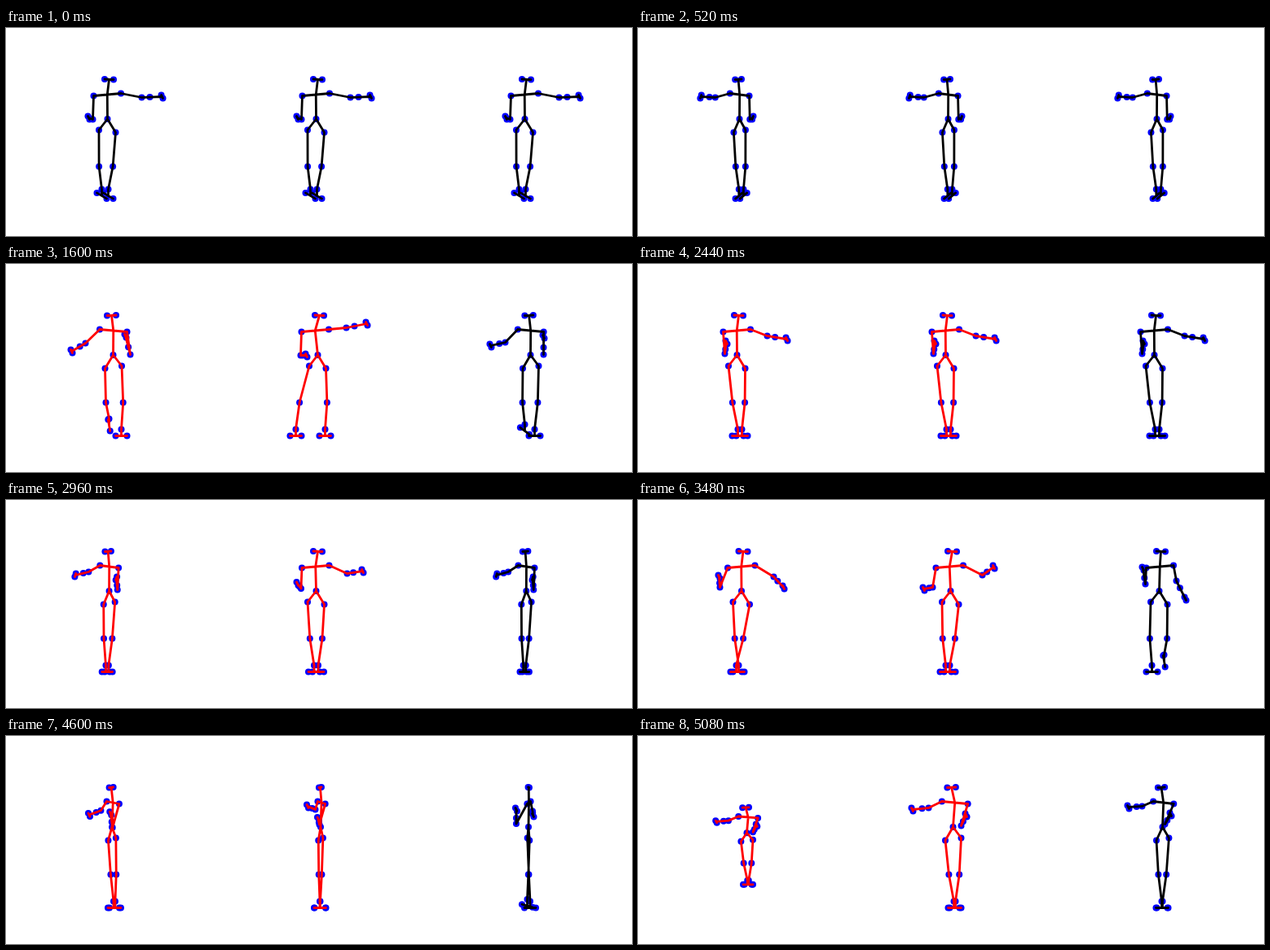
Animation of 768x256 px, one loop 5.12 s. Source, as an HTML page with a canvas:

```html
<!DOCTYPE html>
<html lang="en">
<head>
<meta charset="utf-8">
<title>Three dancing stick figures</title>
<style>
html, body { margin: 0; width: 100%; height: 100%; overflow: hidden; background: #fff; }
canvas { display: block; }
</style>
</head>
<body>
<canvas id="stage" width="768" height="256"></canvas>
<script>
const ctx = document.getElementById('stage').getContext('2d');
const LOOP = 5120, STEP = 40, PANEL = 256, RED_FROM = 640;

const mix = (a, b, u) => a.map((v, i) => v + (b[i] - v) * u);
const middle = (a, b) => mix(a, b, 0.5);
const pair = ([x, y], dx, dy) => [[x + dx, y + dy], [x - dx, y - dy]];

// Shoulder, elbow, forearm and two wrist markers.
const arm = (shoulder, [elbow, hand]) =>
  [shoulder, elbow, mix(elbow, hand, 0.4), ...pair(hand, 1, 2)];

// Hip, knee, ankle and two foot markers; a lifted foot points down.
function leg(hip, [x, y = 203], outward) {
  const knee = [mix(hip, [x, y], 0.6)[0] + 2 * outward, 170];
  const tilt = Math.max(0, 203 - y) / 13 * 1.4;
  return [hip, knee, [x, y], ...pair([x, y + 8], 7 * Math.cos(tilt), 7 * Math.sin(tilt))];
}

// turn: 1 faces the viewer, -1 shows the back. reach and fold: [elbow, hand].
// feet: ankles of the reaching and the folded side.
function pose({ x, turn = 1, lean = 0, reach, fold, feet }) {
  const side = (offset, y, shift = 0) => [x + shift + offset * turn, y];
  return [
    side(7.5, 63), side(-3.5, 62.5), [x, 111.5],
    ...arm(side(16.5, 80, lean), reach), ...arm(side(-17, 83, lean), fold),
    ...leg(side(10, 128), feet[0], turn), ...leg(side(-10.5, 125), feet[1], -turn)
  ];
}

const remap = (body, fx, fy = y => y) => body.map(([x, y]) => [fx(x), fy(y)]);
const turned = (body, width) => remap(body, x => 124 - width * (x - 124));

const start = pose({ x: 124, reach: [[166, 85], [191, 84]],
  fold: [[106, 112], [101, 110]], feet: [[125, 198], [117, 198]] });
const step = pose({ x: 123.5, reach: [[161, 82], [184, 86]],
  fold: [[113, 113], [105, 99]], feet: [[145], [101]] });
const closed = pose({ x: 121, reach: [[158, 88], [182, 92]],
  fold: [[106, 110], [108, 96]], feet: [[127], [122]] });
const end = pose({ x: 130, turn: -0.95, lean: 2, reach: [[100, 88], [80, 90]],
  fold: [[140, 110], [146, 97]], feet: [[131], [133]] });
const shrunk = remap(end, x => 133 + 0.75 * (x - 130), y => 119 + 0.64 * (y - 112));

const leftBack = pose({ x: 131, turn: -1, reach: [[97, 97], [80, 107]],
  fold: [[152, 111], [146, 88]], feet: [[126, 190], [141]] });
const leftOpen = pose({ x: 126.5, reach: [[166, 94], [178, 107]],
  fold: [[100, 107], [99, 94]], feet: [[120], [123]] });
const leftSide = pose({ x: 129, turn: 0.1, reach: [[134, 95], [126, 104]],
  fold: [[119, 115], [107, 92]], feet: [[132], [134]] });

const midStep = pose({ x: 126, lean: -3, reach: [[161, 78], [186, 73]],
  fold: [[105, 112], [112, 112]], feet: [[135], [99]] });
const midOpen = pose({ x: 127, lean: -1, reach: [[166, 92], [180, 82]],
  fold: [[105, 107], [94, 109]], feet: [[126], [121]] });
const midSide = pose({ x: 129, turn: 0.4, reach: [[146, 92], [147, 82]],
  fold: [[116, 107], [107, 106]], feet: [[126], [125]] });

const rightBack = pose({ x: 131, turn: -0.95, reach: [[100, 96], [82, 100]],
  fold: [[147, 111], [147, 89]], feet: [[124, 197], [136]] });
const rightOpen = pose({ x: 127, lean: 1, reach: [[148, 99], [159, 121]],
  fold: [[110, 103], [107, 84]], feet: [[133, 190], [118]] });
const rightWide = pose({ x: 126, reach: [[161, 98], [179, 107]],
  fold: [[93, 107], [86, 84]], feet: [[124, 198], [130]] });
const rightEnd = pose({ x: 131, turn: -0.75, lean: 1, reach: [[106, 86], [89, 87]],
  fold: [[134, 108], [141, 96]], feet: [[130], [131]] });

const opening = [[0, start], [580, turned(start, 0.76)]];
const dancers = [
  { reddens: true, keys: [...opening, [1040, step], [1600, leftBack],
    [1900, turned(closed, 0.96)], [2440, closed], [2960, turned(closed, 0.68)],
    [3480, leftOpen], [4120, leftSide], [5040, end], [5080, shrunk]] },
  { reddens: true, keys: [...opening, [1040, midStep], [1600, midStep],
    [2440, closed], [3480, midOpen], [4120, midSide], [5080, end]] },
  { reddens: false, keys: [...opening, [1040, step], [1600, rightBack],
    [1840, turned(closed, 0.8)], [2440, closed], [3040, turned(closed, 0.68)],
    [3480, rightOpen], [4120, rightWide], [5080, rightEnd]] }
];

function poseAt(keys, time) {
  const next = keys.findIndex(([t]) => t > time);
  if (next < 0) return keys[keys.length - 1][1];
  const [t0, from] = keys[next - 1], [t1, to] = keys[next];
  const u = (time - t0) / (t1 - t0), eased = u * u * (3 - 2 * u);
  return from.map((point, i) => mix(point, to[i], eased));
}

function drawBody(body, color) {
  const [headA, headB, pelvis] = body;
  const limbs = [3, 8, 13, 18].map(i => body.slice(i, i + 5));
  const [armA, armB, legA, legB] = limbs;

  ctx.fillStyle = '#00f';
  for (const [x, y] of body) {
    ctx.beginPath();
    ctx.arc(x, y, 4, 0, 2 * Math.PI);
    ctx.fill();
  }

  ctx.strokeStyle = color;
  ctx.beginPath();
  const line = (...points) => points.forEach(([x, y], i) =>
    ctx[i ? 'lineTo' : 'moveTo'](x, y));
  line(headA, headB);
  line(middle(headA, headB), middle(armA[0], armB[0]), pelvis);
  line(armA[0], armB[0]);
  line(legA[0], pelvis, legB[0]);
  for (const [root, joint, tip, endA, endB] of limbs) {
    line(root, joint, tip, middle(endA, endB));
    line(endA, endB);
  }
  ctx.stroke();
}

function draw(now) {
  const time = Math.floor(now % LOOP / STEP) * STEP;
  ctx.clearRect(0, 0, 768, 256);
  ctx.lineWidth = 2.8;
  ctx.lineCap = ctx.lineJoin = 'round';
  dancers.forEach(({ reddens, keys }, i) => {
    ctx.save();
    ctx.translate(i * PANEL + 0.5, 0.5);
    drawBody(poseAt(keys, time), reddens && time >= RED_FROM ? '#f00' : '#000');
    ctx.restore();
  });
}

const began = performance.now();
function tick() {
  draw(performance.now() - began);
  requestAnimationFrame(tick);
}
tick();
</script>
</body>
</html>
```
